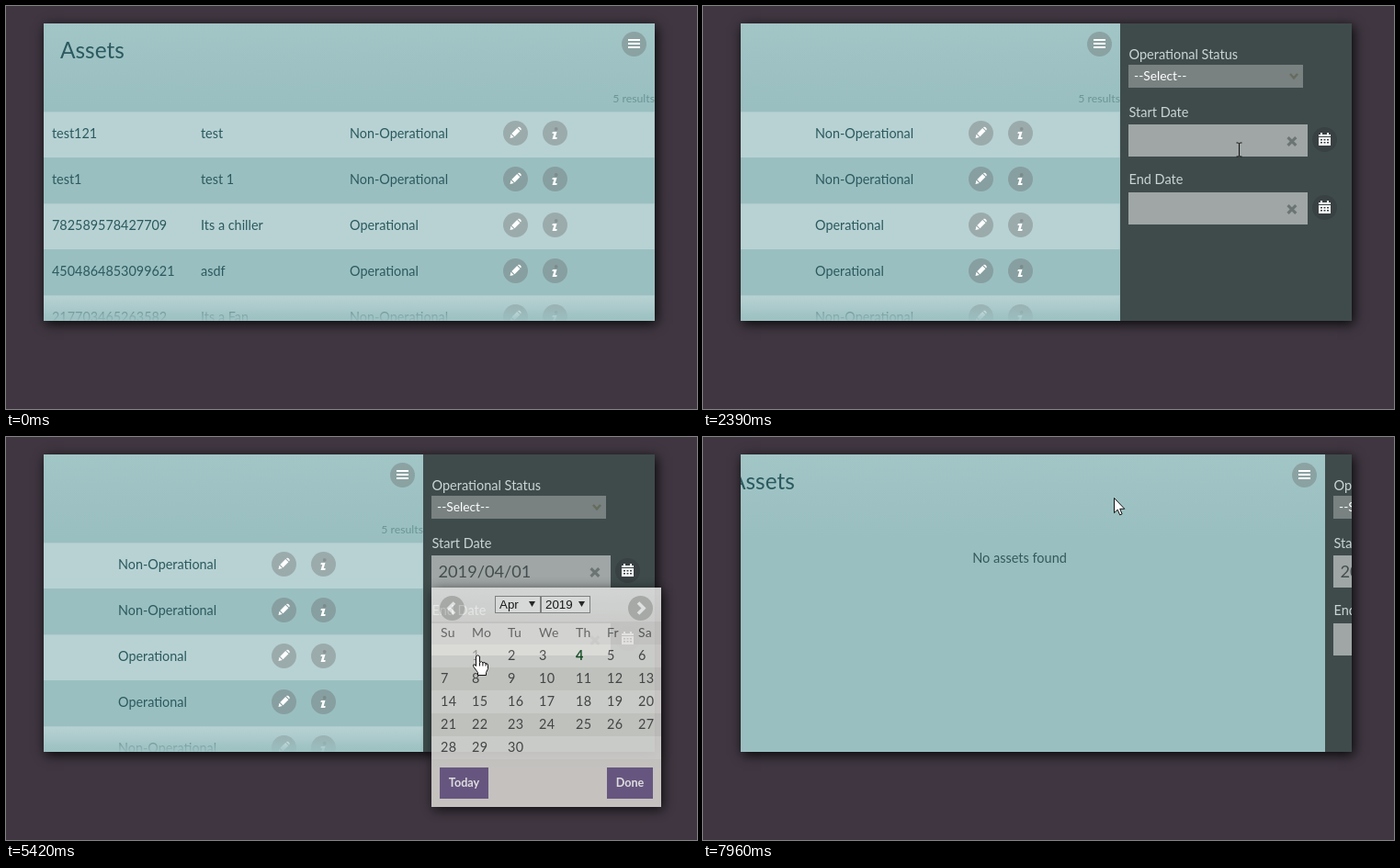
These frames come from a looping animation (752x439 px, 8000 ms). An HTML page with a canvas:

```html
<!DOCTYPE html>
<html lang="en">
<head>
<meta charset="utf-8">
<title>Assets</title>
<style>
html, body { margin: 0; width: 100%; height: 100%; overflow: hidden; background: #3f3641; }
canvas { display: block; }
</style>
</head>
<body>
<canvas id="stage" width="752" height="439"></canvas>
<script>
const LOOP = 8000, OPEN = 252, SLIDE = 500, FADE = 300;
const T = {
  open: 1625, focus: 3855, today: 4600, pick: 5160, blur: 5340,
  load: 5800, empty: 6030, close: 7660
};
const BOX = { x: 41, y: 19, w: 665, h: 324 };
const SANS = 'Lato, "Open Sans", sans-serif';
const ARIAL = '"Liberation Sans", Arial, sans-serif';
const TEAL = '#9abfc0', INK = '#2b5a5f';

const stage = document.getElementById('stage').getContext('2d');
const layer = document.createElement('canvas');
layer.width = 752;
layer.height = 439;
const calendar = layer.getContext('2d');
let g = stage;

const rows = [
  ['test121', 'test', 'Non-Operational'],
  ['test1', 'test 1', 'Non-Operational'],
  ['782589578427709', 'Its a chiller', 'Operational'],
  ['4504864853099621', 'asdf', 'Operational'],
  ['217703465263582', 'Its a Fan', 'Non-Operational']
];
const days = ['Su', 'Mo', 'Tu', 'We', 'Th', 'Fr', 'Sa'];
const dayX = [473, 507, 546, 580, 620, 654, 688];

// time, x, y of the pointer
const path = [
  [70, 697, 338], [230, 695, 45], [460, 695, 45], [620, 682, 9], [770, 697, 48],
  [1380, 697, 48], [1600, 685, 42], [2200, 685, 42], [2390, 583, 156],
  [2470, 574, 205], [2620, 580, 163], [2750, 580, 163], [3150, 688, 157],
  [3320, 677, 149], [4250, 677, 149], [4640, 617, 240], [4700, 617, 240],
  [5190, 513, 237], [5740, 513, 237], [5880, 549, 247], [6110, 556, 304],
  [6380, 556, 304], [6960, 431, 44], [7060, 431, 44], [7190, 432, 40],
  [7650, 432, 40], [7940, 447, 66]
];
// pointer kind from a given time on
const kinds = [
  [70, 'arrow'], [1500, 'hand'], [1660, 'arrow'], [2330, 'beam'], [2430, 'arrow'],
  [2530, 'beam'], [3060, 'arrow'], [3230, 'hand'], [4330, 'arrow'], [4580, 'hand'],
  [5660, 'arrow'], [7080, 'hand'], [7700, 'arrow']
];

const ARROW = new Path2D('M0 0V16.2L3.7 12.7L6.2 18.4L8.6 17.4L6.2 11.8H11.3Z');
const HAND = new Path2D('M-2 1.5Q0-1 2 1.5V8Q4.5 6 5.5 8.5Q8 7 8.7 9.5Q11 8.5 11 11.5V15L9 19V22H0V19L-4.5 13Q-6 10-3.5 10.2L-2 12Z');
const BEAM = new Path2D('M-3-7.5H-1L0-6.5L1-7.5H3M0-6.5V6.5M-3 7.5H-1L0 6.5L1 7.5H3');
const PENCIL = new Path2D('M-6 6L-5 1.8L-1.8 5ZM-4.2 1L1.7-4.9L4.9-1.7L-1 4.2ZM2.5-5.7L3.2-6.2Q4-6.6 4.8-5.9L5.9-4.8Q6.6-4 6.1-3.2L5.6-2.6Z');
const INFO = new Path2D('M-2.6-1.8H2L.2 4.2H2.2L1.8 6.2H-3L-1.2.2H-3.1Z');

const clamp = v => Math.max(0, Math.min(1, v));
const swing = p => .5 - Math.cos(Math.PI * clamp(p)) / 2;

function bez(a, b, s) {
  return 3 * a * s * (1 - s) ** 2 + 3 * b * s * s * (1 - s) + s ** 3;
}

function ease(p) {
  if (p <= 0) return 0;
  if (p >= 1) return 1;
  let lo = 0, hi = 1;
  for (let i = 0; i < 24; i++) {
    const mid = (lo + hi) / 2;
    if (bez(.25, .25, mid) < p) lo = mid; else hi = mid;
  }
  return bez(.1, 1, lo);
}

function rect(x, y, w, h, fill) {
  g.fillStyle = fill;
  g.fillRect(x, y, w, h);
}

function disc(x, y, fill) {
  g.fillStyle = fill;
  g.beginPath();
  g.arc(x, y, 13.5, 0, 7);
  g.fill();
}

function text(s, x, y, size, fill, opt = {}) {
  g.font = `${opt.weight || 400} ${size}px ${opt.font || SANS}`;
  g.textAlign = opt.align || 'left';
  g.letterSpacing = opt.gap || '0px';
  g.fillStyle = fill;
  g.fillText(s, x, y);
}

function line(points, width, color) {
  g.strokeStyle = color;
  g.lineWidth = width;
  g.beginPath();
  points.forEach(([x, y]) => g.lineTo(x, y));
  g.stroke();
}

function shade(y0, y1, ...stops) {
  const grad = g.createLinearGradient(0, y0, 0, y1);
  stops.forEach(([p, c]) => grad.addColorStop(p, c));
  return grad;
}

function shadowBox(x, y, w, h, fill) {
  g.save();
  g.shadowColor = 'rgba(0,0,0,.9)';
  g.shadowBlur = 12;
  g.shadowOffsetX = 2;
  g.shadowOffsetY = 3;
  rect(x, y, w, h, fill);
  g.restore();
}

function shape(p, x, y, fill) {
  g.save();
  g.translate(x, y);
  g.fillStyle = fill;
  g.fill(p);
  g.restore();
}

function rowIcons(y) {
  const tint = 'rgba(100,100,100,.35)';
  disc(554.5, y, tint);
  shape(PENCIL, 554.5, y - .5, '#fff');
  disc(597.5, y, tint);
  shape(INFO, 597.5, y + .3, '#fff');
  g.beginPath();
  g.arc(598.7, y - 4.6, 1.9, 0, 7);
  g.fill();
}

function table() {
  rows.forEach((cells, i) => {
    const y = 115 + 50 * i;
    if (i % 2 === 0) {
      rect(41, y, 665, 50, '#b8d2d3');
      rect(41, y, 665, 1, '#aecbcc');
      rect(705, y, 1, 50, '#a9c8c9');
    }
    cells.forEach((s, c) => text(s, [50, 212, 374][c], y + 29, 14.4, INK));
    rowIcons(y + 23.5);
  });
  rect(41, 312, 665, 31, shade(315, 343,
    [0, 'rgba(154,191,192,0)'], [.45, 'rgba(154,191,192,.4)'],
    [.75, 'rgba(154,191,192,.75)'], [1, 'rgba(154,191,192,.95)']));
}

function assets(t) {
  rect(41, 19, 665, 324, shade(19, 110, [0, '#a2c5c6'], [1, TEAL]));
  text('Assets', 59, 57, 24.4, INK);
  disc(683.5, 41.5, 'rgba(100,100,100,.35)');
  for (const y of [36, 40, 44]) rect(677, y, 13, 2, '#fff');
  if (t < T.load) table();
  else if (t < T.empty) {
    g.lineWidth = 1;
    g.strokeStyle = '#5f7f80';
    g.strokeRect(366.5, 126.5, 3, 8);
    rect(372, 125, 4, 11, '#111');
    rect(373, 126, 2, 9, '#3b4d4e');
  } else text('No assets found', 373.5, 137, 14.5, '#35595c', { align: 'center' });
  if (t < T.empty) text('5 results', 706, 105, 12.3, '#6a9596', { align: 'right' });
}

function field(y, value, focused) {
  rect(463, y, 195, 35, focused ? '#fff' : '#9fa6a5');
  if (focused) {
    g.strokeStyle = '#4a78c4';
    g.lineWidth = 2;
    g.strokeRect(463, y + 0, 194, 35);
  }
  if (value) text(value, 470.5, y + 24, 18.2, '#444d4d');
  const c = focused ? '#9fa3a2' : '#6c7574', m = y + 18.5;
  line([[636.5, m - 4.3], [645.3, m + 4.3]], 3.2, c);
  line([[645.3, m - 4.3], [636.5, m + 4.3]], 3.2, c);
  // calendar button
  disc(676.5, y + 16.5, '#394143');
  rect(670, y + 11, 13, 12, '#fff');
  rect(672, y + 9, 2, 3, '#fff');
  rect(679, y + 9, 2, 3, '#fff');
  rect(670, y + 13, 13, 1, '#394143');
  for (let i = 0; i < 3; i++)
    for (let j = 0; j < 2; j++) rect(672 + i * 3.5, y + 16 + j * 3, 2, 1.5, '#394143');
}

function filters(t) {
  const label = '#c9d5d4';
  rect(454, 19, 252, 324, '#3f4b4b');
  text('Operational Status', 463.5, 58, 14.5, label);
  rect(463, 64, 190, 25, '#798181');
  text('--Select--', 469, 81, 13.8, '#fff');
  line([[639, 74], [643, 78.5], [647, 74]], 2.4, '#656c5c');
  text('Start Date', 463.5, 121, 14.5, label);
  const focused = t >= T.focus && t < T.blur;
  field(129, t >= T.pick ? '2019/04/01' : '', focused);
  if (focused && t < T.pick && (t - T.focus) % 1000 < 500) rect(470, 136, 1, 22, '#222');
  text('End Date', 463.5, 194, 14.5, label);
  field(203, '', false);
}

function dropdown(x, w, s) {
  rect(x, 173, w, 19, '#f6f6f5');
  g.strokeStyle = '#8b8b8b';
  g.lineWidth = 1;
  g.strokeRect(x + .5, 173.5, w - 1, 18);
  text(s, x + 5, 187, 13.33, '#111', { font: ARIAL });
  g.fillStyle = '#222';
  g.beginPath();
  g.moveTo(x + w - 13, 179);
  g.lineTo(x + w - 6, 179);
  g.lineTo(x + w - 9.5, 185);
  g.fill();
}

function drawCalendar(t) {
  g = calendar;
  g.clearRect(0, 0, 752, 439);
  shadowBox(463, 164, 250, 239, '#dfded9');
  rect(463, 164, 250, 40, shade(164, 204, [0, '#f0f1f0'], [1, '#e7e6e4']));
  rect(463, 201, 250, 25, '#dddcd9');
  for (let i = 0; i < 5; i++) rect(463, 226 + 25 * i, 250, 25, i % 2 ? '#dad9d5' : '#e6e5e2');
  for (const [x, d] of [[485.5, -1], [690.5, 1]]) {
    disc(x, 186.5, '#bcbcba');
    line([[x - 2.5 * d, 180.5], [x + 3.5 * d, 186.5], [x - 2.5 * d, 192.5]], 3.6, '#fff');
  }
  dropdown(532, 50, 'Apr');
  dropdown(582, 54, '2019');
  const gap = { gap: '.3px' };
  days.forEach((d, i) => text(d, dayX[i], 218, 14, '#595959', gap));
  for (let d = 1; d <= 30; d++) {
    const x = dayX[d % 7], y = 243 + 25 * Math.floor(d / 7);
    let color = '#454545', opt = gap;
    if (d === 1 && t > 5100) color = '#999';
    if (d === 4) {
      color = t < T.today ? '#999' : '#0c4a1c';
      if (t >= T.today) opt = { gap: '.3px', weight: 700 };
    }
    text(d, x, y, 14.4, color, opt);
  }
  const bold = { weight: 700, align: 'center' };
  rect(472, 360, 53, 34, '#6e5d8c');
  text('Today', 498.5, 381, 12.6, '#fff', bold);
  rect(654, 360, 50, 34, '#6e5d8c');
  text('Done', 679, 381, 12.6, '#fff', bold);
  g = stage;
}

function pointer(t) {
  if (t < path[0][0]) return;
  let i = 0;
  while (i < path.length - 2 && t >= path[i + 1][0]) i++;
  const [t0, x0, y0] = path[i], [t1, x1, y1] = path[i + 1];
  const p = swing((t - t0) / (t1 - t0));
  const kind = kinds.filter(k => t >= k[0]).pop()[1];
  g.save();
  g.translate(Math.round(x0 + (x1 - x0) * p) + .5, Math.round(y0 + (y1 - y0) * p) + .5);
  g.lineWidth = 1;
  g.strokeStyle = '#111';
  if (kind === 'beam') g.stroke(BEAM);
  else {
    const p2 = kind === 'hand' ? HAND : ARROW;
    g.fillStyle = '#fff';
    g.fill(p2);
    g.stroke(p2);
    if (kind === 'hand') {
      for (const x of [2, 5.4, 8.6]) line([[x, 8.5], [x, 12]], 1, '#111');
    }
  }
  g.restore();
}

function draw(t) {
  const shift = Math.round(OPEN * (ease((t - T.open) / SLIDE) - ease((t - T.close) / SLIDE)));
  rect(0, 0, 752, 439, '#3f3641');
  shadowBox(BOX.x, BOX.y, BOX.w, BOX.h, TEAL);
  g.save();
  g.beginPath();
  g.rect(BOX.x, BOX.y, BOX.w, BOX.h);
  g.clip();
  g.save();
  g.translate(-shift, 0);
  assets(t);
  g.restore();
  g.translate(OPEN - shift, 0);
  filters(t);
  g.restore();

  const alpha = swing((t - T.focus) / FADE) - swing((t - T.blur) / FADE);
  if (alpha > .001) {
    drawCalendar(t);
    g.globalAlpha = alpha;
    g.drawImage(layer, 0, 0);
    g.globalAlpha = 1;
  }
  pointer(t);
}

const start = performance.now();
function tick() {
  draw((performance.now() - start) % LOOP);
  requestAnimationFrame(tick);
}
tick();
</script>
</body>
</html>
```
